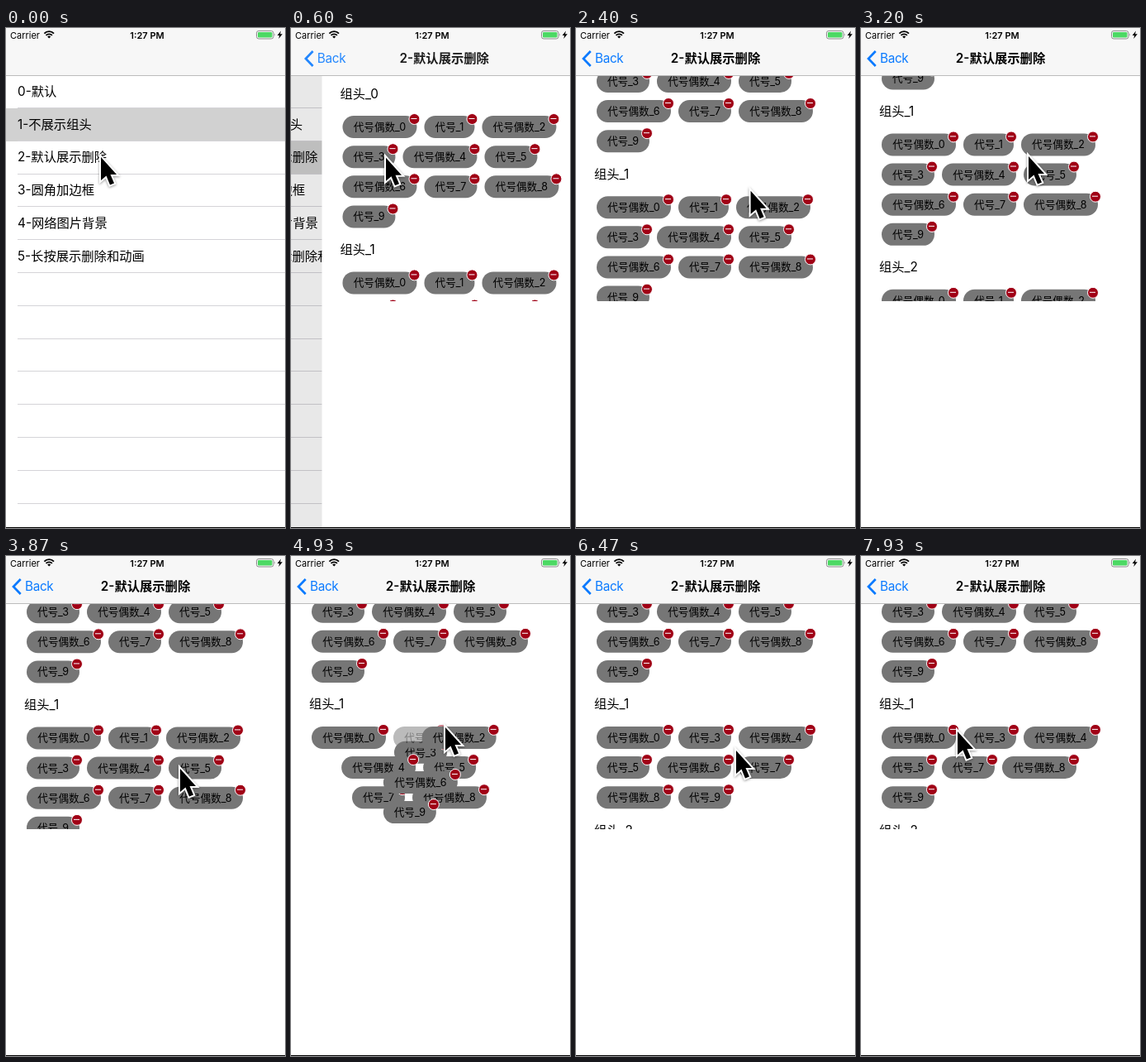
Recreate the animation shown at these times as an HTML page. Size 338x604 px, loop 8000 ms.

```html
<!DOCTYPE html>
<html lang="zh-CN">
<head>
<meta charset="utf-8">
<title>Tag list</title>
<style>
  html, body { margin: 0; width: 100%; height: 100%; overflow: hidden; background: #fff; }
  body { font: 15.3px/20px Inter, "Noto Sans CJK SC", "Noto Sans CJK", sans-serif; color: #000; }
  #stage { position: relative; width: 338px; height: 604px; overflow: hidden; background: #fff; white-space: nowrap; }
  #stage div, #stage svg { position: absolute; }
  .page { left: 0; top: 0; width: 338px; height: 604px; background: #fff; }
  .row { left: 0; width: 338px; height: 39.8px; }
  .row span { position: absolute; left: 14px; top: 9.5px; }
  .row::after { content: ""; position: absolute; left: 14px; right: 0; bottom: 0; height: 1px; background: #d5d4d8; }
  .row.on { background: #d1d1d1; }
  #shade { inset: 0; background: #000; }
  #clip { left: 0; top: 0; width: 338px; height: 330px; overflow: hidden; }
  #scroll { left: 0; top: 0; width: 338px; }
  .head { left: 22px; top: 0; }
  .chip { left: 0; top: 0; height: 27px; border-radius: 13.5px; background: #767676;
          font-size: 12.6px; line-height: 27px; text-align: center; }
  .chip i { position: absolute; right: -3.5px; top: -3.5px; width: 12px; height: 12px;
            border: 1px solid #fff; border-radius: 50%; background: #a00016; }
  .chip i::after { content: ""; position: absolute; left: 2.5px; top: 5.1px; width: 7px; height: 1.8px; background: #fff; }
  #bar { left: 0; top: 0; width: 338px; height: 57px; background: #f7f7f7; border-bottom: 1px solid #bcbcbc; }
  #bar .small { font-size: 11px; line-height: 14px; top: 1.5px; }
  #clock { left: 0; width: 342px; text-align: center; font-weight: 600; }
  #title { left: 0; top: 27px; width: 338px; text-align: center; font-weight: 600; }
  #back { left: 0; top: 27px; color: #0a7aff; }
  #back span { position: absolute; left: 23px; letter-spacing: -.35px; }
  #edge { left: 0; top: 603px; width: 338px; height: 1px; background: #000; }
  #cursor { left: 0; top: 0; overflow: visible; filter: drop-shadow(0 1px 1.5px rgba(0,0,0,.4)); }
</style>
</head>
<body>
<div id="stage">
  <div id="menu" class="page"><div id="shade"></div></div>
  <div id="detail" class="page"><div id="clip"><div id="scroll"></div></div></div>
  <div id="bar">
    <div class="small" style="left:5px">Carrier</div>
    <div class="small" id="clock">1:27 PM</div>
    <svg width="338" height="16" fill="none">
      <g stroke="#000" stroke-width="1.9">
        <path d="M46.4 6.6a8 8 0 0 1 11.6 0M48.5 8.9a5.2 5.2 0 0 1 7.4 0"/>
        <path d="M52.2 12.6l-2-2.2a2.8 2.8 0 0 1 4 0z" fill="#000" stroke="none"/>
      </g>
      <rect x="303.5" y="3.5" width="20.5" height="9.5" rx="2.6" stroke="#8c8c8c"/>
      <rect x="305" y="5" width="17.5" height="6.5" rx="1.3" fill="#4cd964"/>
      <path d="M325.3 6.6q1.6 1.6 0 3.2z" fill="#8c8c8c"/>
      <path d="M333 3.5l-4.3 5.4h2.6l-1 4 4.6-5.6h-2.8z" fill="#000"/>
    </svg>
    <div id="title">2-默认展示删除</div>
    <div id="back">
      <svg width="22" height="22" style="top:-1px" fill="none" stroke="#0a7aff" stroke-width="2.7"><path d="M17.7 2L9 11l8.7 9"/></svg>
      <span>Back</span>
    </div>
  </div>
  <div id="edge"></div>
  <svg id="cursor" width="24" height="40">
    <path d="M0 0V28L6.5 22.5 11 33.5 16 31.5 11.5 21H19Z" fill="#000" stroke="#fff" stroke-width="4" paint-order="stroke"/>
  </svg>
</div>
<script>
const LOOP = 8000, ROW = 36.15, GROUP = 188.4, FIRST_TOP = 106;
const $ = id => document.getElementById(id);
const clamp = x => Math.min(1, Math.max(0, x));
const smooth = x => x * x * (3 - 2 * x);
const mix = (a, b, p) => a + (b - a) * p;
const move = (el, x, y) => { el.style.transform = `translate(${x}px,${y}px)`; };

function add(parent, className, html) {
  const el = document.createElement('div');
  el.className = className;
  el.innerHTML = html;
  parent.append(el);
  return el;
}

// keys: [time, ...values], eased between neighbours
function track(keys, t) {
  let i = 0;
  while (i < keys.length - 2 && t >= keys[i + 1][0]) i++;
  const [a, b] = [keys[i], keys[i + 1]];
  const p = smooth(clamp((t - a[0]) / (b[0] - a[0])));
  return a.slice(1).map((v, k) => mix(v, b[k + 1], p));
}

const labels = ['默认', '不展示组头', '默认展示删除', '圆角加边框', '网络图片背景', '长按展示删除和动画'];
const rows = Array.from({ length: 14 }, (_, i) => {
  const el = add($('menu'), 'row', i < labels.length ? `<span>${i}-${labels[i]}</span>` : '');
  el.style.top = 57.2 + i * 39.8 + 'px';
  return el;
});
$('menu').append($('shade'));

const ids = [...Array(10).keys()];
const chipWidth = n => n % 2 === 0 ? 90 : n === 1 ? 61 : 64;

// Left-aligned flow layout of one group
function flow(list) {
  const at = {};
  let x = 25, row = 0;
  for (const n of list) {
    const w = chipWidth(n);
    if (x + w > 290) { x = 25; row++; }
    at[n] = { x, y: row * ROW };
    x += w + 9;
  }
  return { at, height: row * ROW };
}

const groups = [0, 1, 2].map(g => ({
  head: add($('scroll'), 'head', `组头_${g}`),
  chips: ids.map(n => {
    const el = add($('scroll'), 'chip', `代号${n % 2 ? '' : '偶数'}_${n}<i></i>`);
    el.style.width = chipWidth(n) + 'px';
    return el;
  })
}));

const removals = [[4780, 1], [6110, 2], [7270, 6]];
const REMOVE_MS = 300;
const layouts = [flow(ids)];
removals.reduce((left, [, n]) => {
  const next = left.filter(m => m !== n);
  layouts.push(flow(next));
  return next;
}, ids);
removals.forEach(([, n]) => { groups[1].chips[n].style.zIndex = 1; });

const cursorPath = [
  [0, 115, 156], [270, 115, 156], [800, 115, 157], [1130, 104, 166], [1600, 174, 138],
  [1930, 220, 288], [2050, 220, 288], [2700, 205, 125], [3000, 201, 122], [3200, 203, 155],
  [3520, 209, 234], [3870, 211, 257], [4200, 211, 257], [4650, 182, 207], [4800, 182, 207],
  [4930, 187, 207], [5200, 196, 212], [5800, 211, 208], [6150, 211, 208], [6470, 194, 235],
  [6900, 185, 244], [7300, 185, 244], [7900, 117, 212], [8000, 117, 212]
];
const scrollPath = [
  [0, 0], [2050, 0], [2700, 163], [2900, 200], [3000, 200], [3200, 167],
  [3520, 88], [4000, 88], [4300, 88.5], [8000, 88.5]
];

function drawGroup({ head, chips }, top, from, to, p) {
  move(head, 0, top - 36.5);
  chips.forEach((el, n) => {
    const a = from.at[n], b = to.at[n];
    el.style.opacity = a ? (b ? 1 : 1 - p) : 0;
    if (!a) return;
    const end = b || a;
    move(el, mix(a.x, end.x, p), top + mix(a.y, end.y, p));
  });
}

function draw(t) {
  const tapped = t >= 270;
  rows[1].classList.toggle('on', !tapped);
  rows[2].classList.toggle('on', tapped);

  const push = 1 - (1 - clamp((t - 310) / 560)) ** 3;
  move($('menu'), -101 * push, 0);
  $('shade').style.opacity = .1 * push;
  move($('detail'), 338 * (1 - push), 0);
  move($('title'), 150 * (1 - push), 0);
  move($('back'), 80 * (1 - push), 0);
  $('title').style.opacity = $('back').style.opacity = push;

  const step = removals.filter(([start]) => t >= start).length;
  const from = layouts[Math.max(0, step - 1)], to = layouts[step];
  const p = step ? smooth(clamp((t - removals[step - 1][0]) / REMOVE_MS)) : 1;
  const shrink = layouts[0].height - mix(from.height, to.height, p);
  drawGroup(groups[0], FIRST_TOP, layouts[0], layouts[0], 1);
  drawGroup(groups[1], FIRST_TOP + GROUP, from, to, p);
  drawGroup(groups[2], FIRST_TOP + 2 * GROUP - shrink, layouts[0], layouts[0], 1);

  move($('scroll'), 0, -track(scrollPath, t)[0]);
  move($('cursor'), ...track(cursorPath, t));
}

const start = performance.now();
function tick() {
  draw((performance.now() - start) % LOOP);
  requestAnimationFrame(tick);
}
tick();
</script>
</body>
</html>
```
